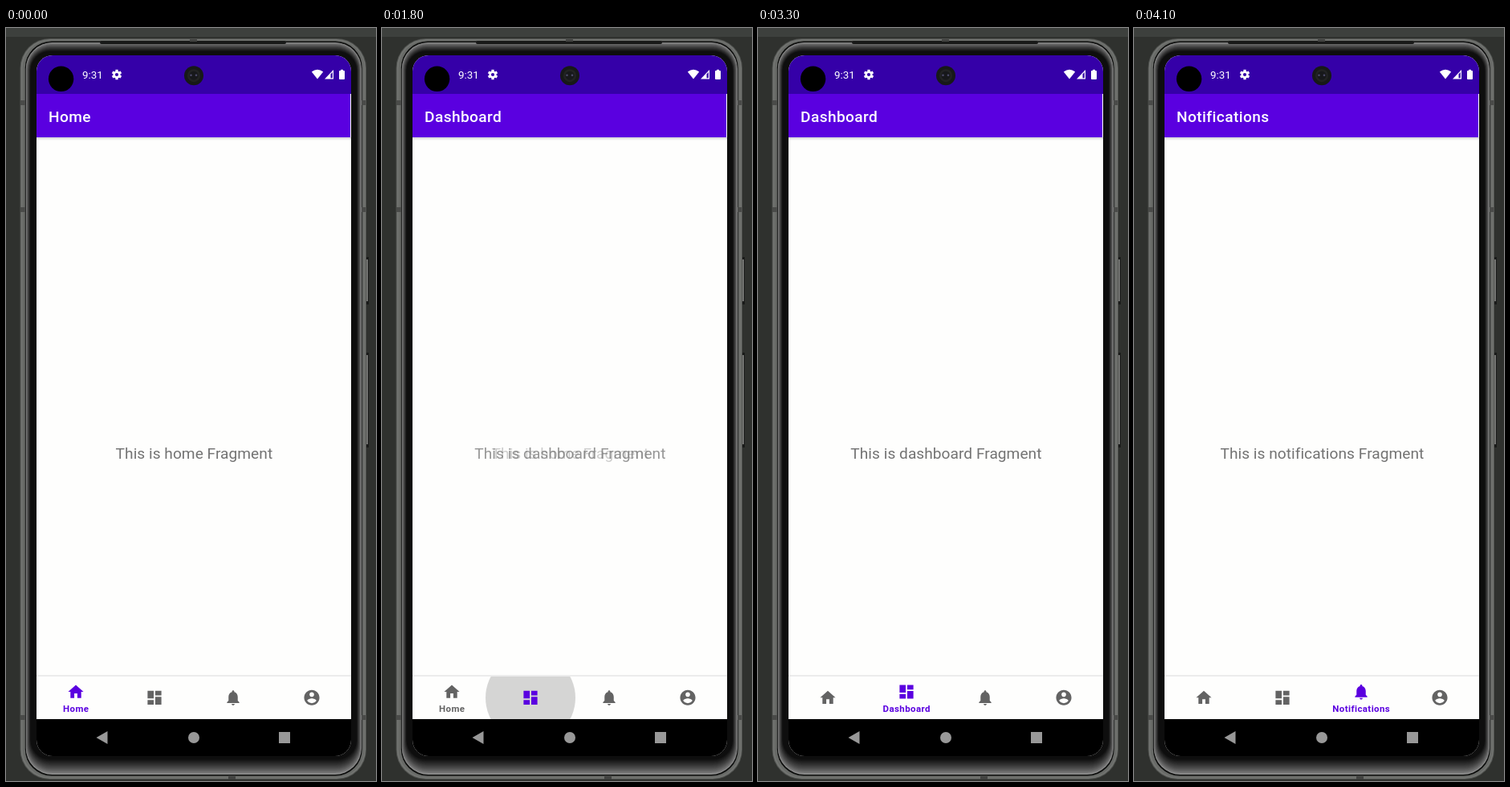
An HTML page with a canvas that plays this animation: 461 by 937 pixels, repeating every 5.4 s.

```html
<!DOCTYPE html>
<html lang="en">
<head>
<meta charset="utf-8">
<title>Bottom navigation</title>
<style>
html, body { margin: 0; width: 100%; height: 100%; overflow: hidden; background: #2f312e; }
canvas { display: block; width: 461px; height: 937px; }
</style>
</head>
<body>
<canvas id="stage"></canvas>
<script>
const W = 461, H = 937, LOOP = 5400, STEP = 100;
const DP = 0.956; // screen pixels per device-independent pixel
const PURPLE = '#5a00e0', STATUS = '#3500a8', GREY = '#636363', PAPER = '#fefefd';
const canvas = document.getElementById('stage');
const dpr = window.devicePixelRatio || 1;
canvas.width = Math.round(W * dpr);
canvas.height = Math.round(H * dpr);
const c = canvas.getContext('2d');
c.scale(dpr, dpr);

const tabs = [
  { x: 87, title: 'Home', body: 'This is home Fragment',
    icon: 'M10 20v-6h4v6h5v-8h3L12 3 2 12h3v8z' },
  { x: 185, title: 'Dashboard', body: 'This is dashboard Fragment',
    icon: 'M3 13h8V3H3v10zm0 8h8v-6H3v6zm10 0h8V11h-8v10zm0-18v6h8V3h-8z' },
  { x: 283, title: 'Notifications', body: 'This is notifications Fragment',
    icon: 'M12 22c1.1 0 2-.9 2-2h-4c0 1.1.89 2 2 2zm6-6v-5c0-3.07-1.64-5.64-4.5-6.32V4c0-.83-.67-1.5-1.5-1.5' +
      's-1.5.67-1.5 1.5v.68C7.63 5.36 6 7.92 6 11v5l-2 2v1h16v-1l-2-2z' },
  { x: 381, title: 'Account', body: '',
    icon: 'M12 2C6.48 2 2 6.48 2 12s4.48 10 10 10 10-4.48 10-10S17.52 2 12 2zm0 3c1.66 0 3 1.34 3 3' +
      's-1.34 3-3 3-3-1.34-3-3 1.34-3 3-3zm0 14.2c-2.5 0-4.71-1.28-6-3.22.03-1.99 4-3.08 6-3.08' +
      ' 1.99 0 5.97 1.09 6 3.08-1.29 1.94-3.5 3.22-6 3.22z' }
];
tabs.forEach(t => t.path = new Path2D(t.icon));

// Finger down, then selection on release
const taps = [
  { from: 0, to: 1, down: 1600, select: 1730 },
  { from: 1, to: 2, down: 3600, select: 3650 }
];

const clamp = v => Math.max(0, Math.min(1, v));
const mix = (a, b, p) => a + (b - a) * p;
const easeOut = p => 1 - (1 - p) ** 2;

function rect(x, y, w, h, color) {
  c.fillStyle = color;
  c.fillRect(x, y, w, h);
}
function round(l, t, r, b, radius, color) {
  c.fillStyle = color;
  c.beginPath();
  c.roundRect(l, t, r - l, b - t, radius);
  c.fill();
}
function disc(x, y, r, color) {
  c.fillStyle = color;
  c.beginPath();
  c.arc(x, y, r, 0, Math.PI * 2);
  c.fill();
}
function poly(color, ...pts) {
  c.fillStyle = color;
  c.beginPath();
  for (let i = 0; i < pts.length; i += 2) c.lineTo(pts[i], pts[i + 1]);
  c.closePath();
  c.fill();
}
// Size in sp, letter spacing in px
function text(str, x, y, weight, size, color, { align = 'left', alpha = 1, spacing = 0 } = {}) {
  c.globalAlpha = alpha;
  c.font = `${weight} ${size * DP}px Roboto, sans-serif`;
  c.letterSpacing = spacing + 'px';
  c.textAlign = align;
  c.fillStyle = color;
  c.fillText(str, x, y);
  c.globalAlpha = 1;
}
function gradient(x0, y0, x1, y1, ...colors) {
  const g = c.createLinearGradient(x0, y0, x1, y1);
  colors.forEach((col, i) => g.addColorStop(i / (colors.length - 1), col));
  return g;
}

function phone() {
  rect(0, 0, W, H, '#2f312e');
  rect(0, 0, W, 11, '#3d403d');

  for (const [top, bottom] of [[285, 344], [404, 522]]) {
    rect(447, top, 5, bottom - top, '#1a1b1a');
    rect(448, top + 3, 3, bottom - top - 7, '#737472');
  }

  round(17.5, 13, 449, 935, 37, '#525451');
  round(18.5, 14, 448, 934, 36, '#727471');
  round(20.5, 15, 446.5, 932.5, 35, '#686a67');
  round(23.8, 16.5, 443.7, 930.5, 33, '#0c0d0c');
  // Soft reflection inside the rim
  for (let i = 0; i <= 20; i++) {
    const p = i / 20, v = Math.round(mix(145, 14, p ** 0.7));
    round(24.8 + 6 * p, 18 + 11 * p, 442.8 - 6 * p, 929 - 19 * p, 33 - 9 * p, `rgb(${v},${v},${v})`);
  }
  round(117, 16, 349, 20, 2, '#181918');

  for (const y of [93, 226, 858]) {
    rect(18, y - 3, 6, 6, '#4a4b49');
    rect(443, y - 3, 5, 6, '#4a4b49');
  }
  rect(229, 14, 9, 3, '#424341');
  rect(277, 930, 9, 5, '#424341');
}

function statusIcons() {
  text('9:31', 95, 63, 400, 14, '#fff');

  c.save();
  c.translate(138, 58);
  for (let i = 0; i < 6; i++) {
    rect(-1.6, -6.2, 3.2, 4, '#fff');
    c.rotate(Math.PI / 3);
  }
  c.restore();
  disc(138, 58, 4.6, '#fff');
  disc(138, 58, 2.1, STATUS);

  c.fillStyle = '#fff';
  c.beginPath();
  c.moveTo(388, 63.5);
  c.lineTo(380.8, 54.5);
  c.quadraticCurveTo(388, 49, 395.2, 54.5);
  c.fill();

  poly('#fff', 397, 63.5, 408, 52, 408, 63.5);
  poly(STATUS, 404.5, 57.5, 406.8, 55, 406.8, 62.3, 404.5, 62.3);

  round(415, 53, 422, 64, 1, '#fff');
  rect(417, 51.8, 3, 2, '#fff');

  disc(68.6, 63.3, 15.7, '#000');
  disc(234, 59.2, 12, '#171918');
  disc(234, 59.2, 8, '#222323');
  disc(234, 59.2, 5.5, '#17181b');
  disc(230.5, 58.8, 1.3, '#4c4a68');
  disc(237, 58.8, 1.3, '#4c4a68');
}

function systemBar() {
  rect(38, 860, 392, 46, '#000');
  poly('#989898', 112.5, 883, 126.5, 875, 126.5, 891);
  disc(234, 883, 7, '#989898');
  rect(340, 876, 14, 14, '#989898');
}

function ripple(tap, t) {
  const age = t - tap.down;
  if (age < 0) return;
  const grow = easeOut(clamp(age / 200));
  const fade = 1 - clamp((t - tap.select - 100) / 310);
  const alpha = mix(0.07, 0.16, clamp(age / 200)) * fade;
  if (alpha <= 0) return;
  const x = tabs[tap.to].x;
  disc(mix(x - 9, x, grow), 833.5, mix(31, 56, grow), `rgba(0,0,0,${alpha})`);
}

function tabItem(tab, active, lift) {
  const color = active ? PURPLE : GREY;
  c.save();
  c.translate(tab.x, mix(833.3, 826, lift));
  c.scale(DP, DP);
  c.translate(-12, -12);
  c.fillStyle = color;
  c.fill(tab.path);
  c.restore();
  if (lift > 0) {
    text(tab.title, tab.x + 0.2, mix(856, 851, lift), 700, 12, color,
      { align: 'center', alpha: lift, spacing: 0.42 });
  }
}

function draw(t) {
  phone();
  c.save();
  c.beginPath();
  c.roundRect(38, 34, 392, 872, 20);
  c.clip();

  const selected = taps.filter(tap => t >= tap.select).pop();
  const current = selected ? selected.to : 0;
  const since = selected ? t - selected.select : 0;
  const fade = selected ? clamp(since / 140) : 1;
  const shift = selected ? clamp((since - 70) / 86) : 1;

  rect(38, 34, 392, 872, PAPER);
  rect(38, 34, 392, 48, STATUS);
  rect(38, 82, 391, 54, PURPLE);
  rect(38, 136, 392, 4, gradient(0, 136, 0, 140, '#d2d0d6', PAPER));
  text(tabs[current].title, 53, 117, 500, 20, '#fff', { spacing: 0.4 });

  const body = (i, alpha) =>
    text(tabs[i].body, 234.4, 536, 400, 20, '#737373', { align: 'center', alpha, spacing: 0.04 });
  if (fade < 1) body(selected.from, (1 - fade) * 0.7);
  body(current, easeOut(fade));

  rect(38, 805, 392, 2, '#ececec');
  c.save();
  c.beginPath();
  c.rect(38, 807, 392, 53);
  c.clip();
  taps.forEach(tap => ripple(tap, t));
  tabs.forEach((tab, i) => {
    const lift = i === current ? shift : selected && i === selected.from ? 1 - shift : 0;
    tabItem(tab, i === current, lift);
  });
  c.restore();

  systemBar();
  statusIcons();
  c.restore();
}

const start = performance.now();
function tick() {
  const t = (performance.now() - start) % LOOP;
  draw(Math.floor(t / STEP) * STEP);
  requestAnimationFrame(tick);
}
tick();
</script>
</body>
</html>
```
